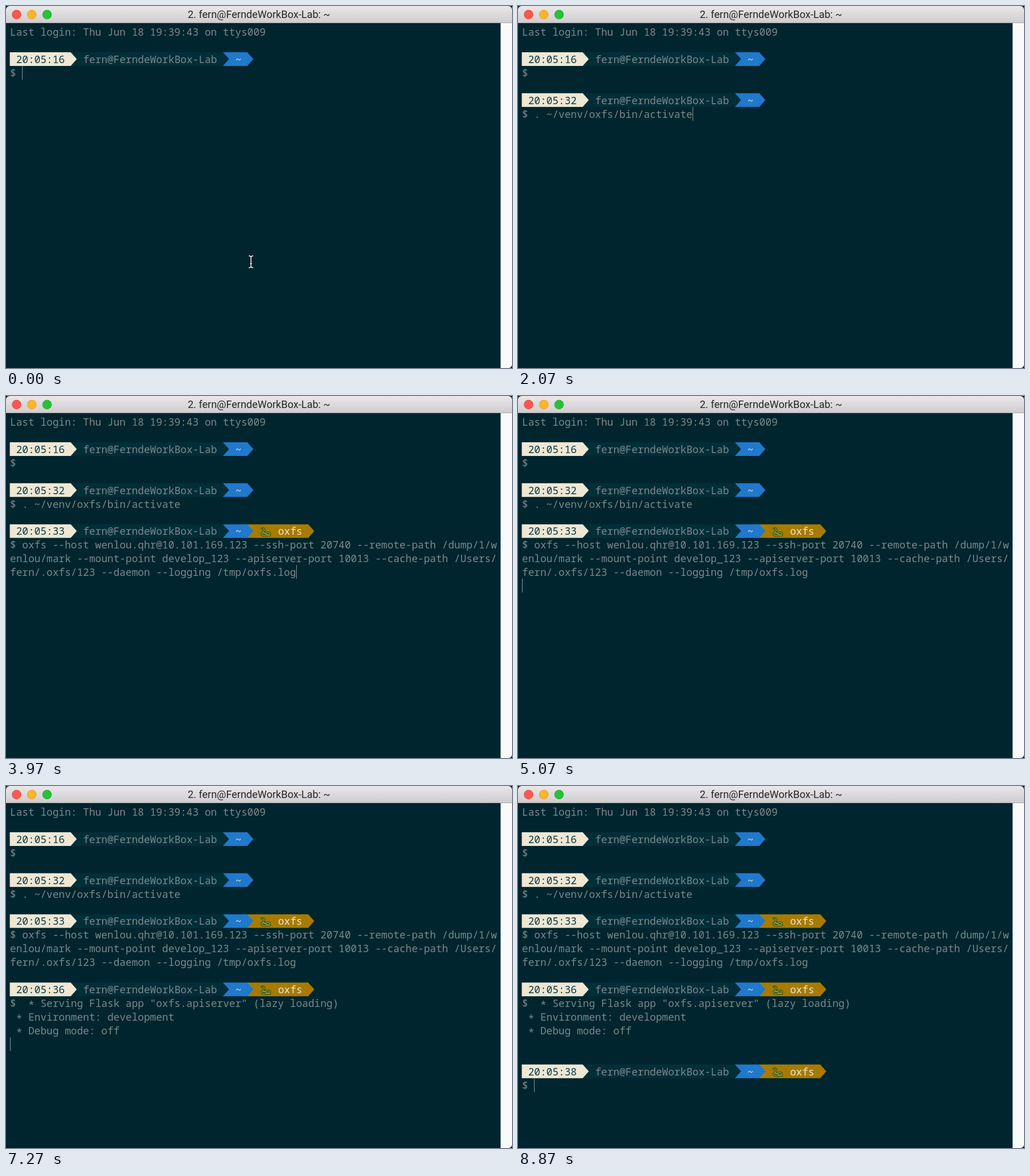
Write an HTML page with a canvas that moves like this. It is 884 px wide and 634 px high and loops after 8.91 s.

```html
<!DOCTYPE html>
<html lang="en">
<head>
<meta charset="utf-8">
<title>Terminal</title>
<style>
html, body { margin: 0; width: 100%; height: 100%; overflow: hidden; background: #00252e; }
canvas { display: block; width: 884px; height: 634px; }
</style>
</head>
<body>
<canvas id="stage" width="884" height="634"></canvas>
<script>
const ctx = document.getElementById("stage").getContext("2d");
const W = 884, H = 634, LOOP = 8910;
const LEFT = 6.6, TOP = 33.2, CELL = 10.64, LINE = 23.93, BASE = 18.8;
const MONO = '17.73px "Noto Sans Mono", "DejaVu Sans Mono", monospace';
const USER = "fern@FerndeWorkBox-Lab";
const C = {
  back: "#00252e", text: "#7a898c", dim: "#64757a", cream: "#eee7d3", ink: "#0d3a44",
  user: "#022e39", blue: "#2079cc", gold: "#a87b00", light: "#e6e6dc"
};

const prompts = [
  { at: 0, row: 2, time: "20:05:16" },
  { at: 1590, row: 5, time: "20:05:32" },
  { at: 2610, row: 8, time: "20:05:33", env: "oxfs" },
  { at: 5610, row: 13, time: "20:05:36", env: "oxfs" },
  { at: 7830, row: 19, time: "20:05:38", env: "oxfs" }
];

const lines = [
  { at: 0, row: 0, col: 0, text: "Last login: Thu Jun 18 19:39:43 on ttys009" },
  { at: 1890, row: 6, col: 2, text: ". ~/venv/oxfs/bin/activate" },
  { at: 3810, row: 9, col: 2, text: "oxfs --host wenlou.qhr@10.101.169.123 --ssh-port 20740 --remote-path /dump/1/w" },
  { at: 3810, row: 10, col: 0, text: "enlou/mark --mount-point develop_123 --apiserver-port 10013 --cache-path /Users/" },
  { at: 3810, row: 11, col: 0, text: "fern/.oxfs/123 --daemon --logging /tmp/oxfs.log" },
  { at: 6690, row: 14, col: 3, text: '* Serving Flask app "oxfs.apiserver" (lazy loading)' },
  { at: 6690, row: 15, col: 1, text: "* Environment: development" },
  { at: 6690, row: 16, col: 1, text: "* Debug mode: off" }
];

// [time, row, column]
const caret = [
  [0, 3, 2], [1080, 4, 0], [1590, 6, 2], [1890, 6, 28], [2190, 7, 0], [2610, 9, 2],
  [3810, 11, 47], [5040, 12, 0], [5610, 14, 2], [6690, 17, 0], [7410, 18, 0], [7830, 20, 2]
];

const colX = c => LEFT + c * CELL;
const rowY = r => TOP + r * LINE;

function put(row, col, text, color, weight = 300) {
  ctx.font = weight + " " + MONO;
  ctx.fillStyle = color;
  ctx.fillText(text, colX(col) + 0.4, Math.round(rowY(row) + BASE));
}

function putLine({ row, col, text }) {
  if (text[0] !== "*") return put(row, col, text, C.text);
  put(row + 0.14, col, "*", C.text);
  put(row, col + 2, text.slice(2), C.text);
}

function poly(color, ...pts) {
  ctx.fillStyle = color;
  ctx.beginPath();
  pts.forEach(([x, y]) => ctx.lineTo(x, y));
  ctx.fill();
}

function disc(x, y, r, color) {
  ctx.fillStyle = color;
  ctx.beginPath();
  ctx.arc(x, y, r, 0, Math.PI * 2);
  ctx.fill();
}

// Block between two columns, with a one-cell arrow on its right
function segment(row, from, to, color) {
  const y = rowY(row), b = rowY(row + 1);
  const x = colX(from), e = colX(to);
  poly(color, [x, y], [e, y], [colX(to + 1), (y + b) / 2], [e, b], [x, b]);
}

function snake(x, y) {
  ctx.save();
  ctx.translate(x, y);
  ctx.lineCap = ctx.lineJoin = "round";
  const body = new Path2D("M4 5 C9 3 9 8 7 10 C4 14 10 13 13 12 C18 11 20 14 16 16 C12 18 5 18 4 15 C3 13 6 12 8 13 C11 15 15 16 18 17");
  [["#263d10", 3.6], ["#5f822c", 2.1], ["#bdb24a", 0.7]].forEach(([color, width]) => {
    ctx.strokeStyle = color;
    ctx.lineWidth = width;
    ctx.stroke(body);
  });
  ctx.fillStyle = "#557626";
  ctx.beginPath();
  ctx.ellipse(4, 4.8, 3, 2, -0.2, 0, Math.PI * 2);
  ctx.fill();
  disc(4, 4.2, 0.7, "#18220a");
  ctx.restore();
}

function drawPrompt({ row, time, env }) {
  if (env) segment(row, 39, 49, C.gold);
  segment(row, 35, 39, C.blue);
  segment(row, 10, 35, C.user);
  segment(row, 0, 10, C.cream);
  put(row, 1, time, C.ink);
  put(row, 12, USER, C.text);
  put(row, 37, "~", C.light);
  if (env) {
    snake(colX(41), rowY(row) + 2.5);
    put(row, 44, env, C.light);
  }
  put(row + 1, 0, "$", C.dim, 600);
}

function titleBar(busy) {
  const g = ctx.createLinearGradient(0, 0, 0, 29);
  g.addColorStop(0, "#e9e7e9");
  g.addColorStop(1, "#cfcdcf");
  ctx.fillStyle = g;
  ctx.beginPath();
  ctx.roundRect(0, 0, W, 29, [6, 6, 0, 0]);
  ctx.fill();
  ctx.fillStyle = "#aaa8aa";
  ctx.fillRect(0, 29, W, 1);
  [["#e2463f", "#fc5650"], ["#e0a023", "#fdb428"], ["#1dab2c", "#27c138"]].forEach(([rim, fill], i) => {
    const x = 18.5 + i * 26.6;
    disc(x, 15, 8.2, rim);
    disc(x, 15, 7.4, fill);
  });
  if (busy) disc(18.5, 15, 2.8, "#6d0d08");
  ctx.font = "18px Roboto, Inter, sans-serif";
  ctx.fillStyle = "#262526";
  ctx.textAlign = "center";
  ctx.fillText("2. " + USER + ": ~", 442, 21);
  ctx.textAlign = "left";
}

function pointer(x, y) {
  const beam = new Path2D("M-4 -10.5 Q0 -10.5 0 -7 Q0 -10.5 4 -10.5 M0 -7 V7 M-4 10.5 Q0 10.5 0 7 Q0 10.5 4 10.5 M-1.5 3 H1.5");
  ctx.save();
  ctx.translate(x, y);
  [["#00161c", 3], ["#f4f6f6", 1.5]].forEach(([color, width]) => {
    ctx.strokeStyle = color;
    ctx.lineWidth = width;
    ctx.stroke(beam);
  });
  ctx.restore();
}

function draw(t) {
  const shown = item => item.at <= t;
  ctx.fillStyle = "#061c23";
  ctx.fillRect(0, 0, W, H);
  ctx.save();
  ctx.beginPath();
  ctx.roundRect(0, 0, W, H, 6);
  ctx.clip();
  ctx.fillStyle = C.back;
  ctx.fillRect(0, 30, W, H - 30);
  ctx.fillStyle = "#fafafa";
  ctx.fillRect(864, 30, 20, H - 30);
  ctx.fillStyle = "#e9e9e9";
  ctx.fillRect(864, 30, 1, H - 30);
  titleBar(t >= 5190 && t < 6180);
  ctx.restore();

  prompts.filter(shown).forEach(drawPrompt);
  lines.filter(shown).forEach(putLine);
  const [, row, col] = caret.filter(c => c[0] <= t).pop();
  ctx.fillStyle = "#8a989a";
  ctx.fillRect(Math.round(colX(col)), Math.round(rowY(row)), 1, 24);
  if (t < 1080) pointer(428, 448);
}

const start = performance.now();
function tick() {
  draw((performance.now() - start) % LOOP);
  requestAnimationFrame(tick);
}
tick();
</script>
</body>
</html>
```
